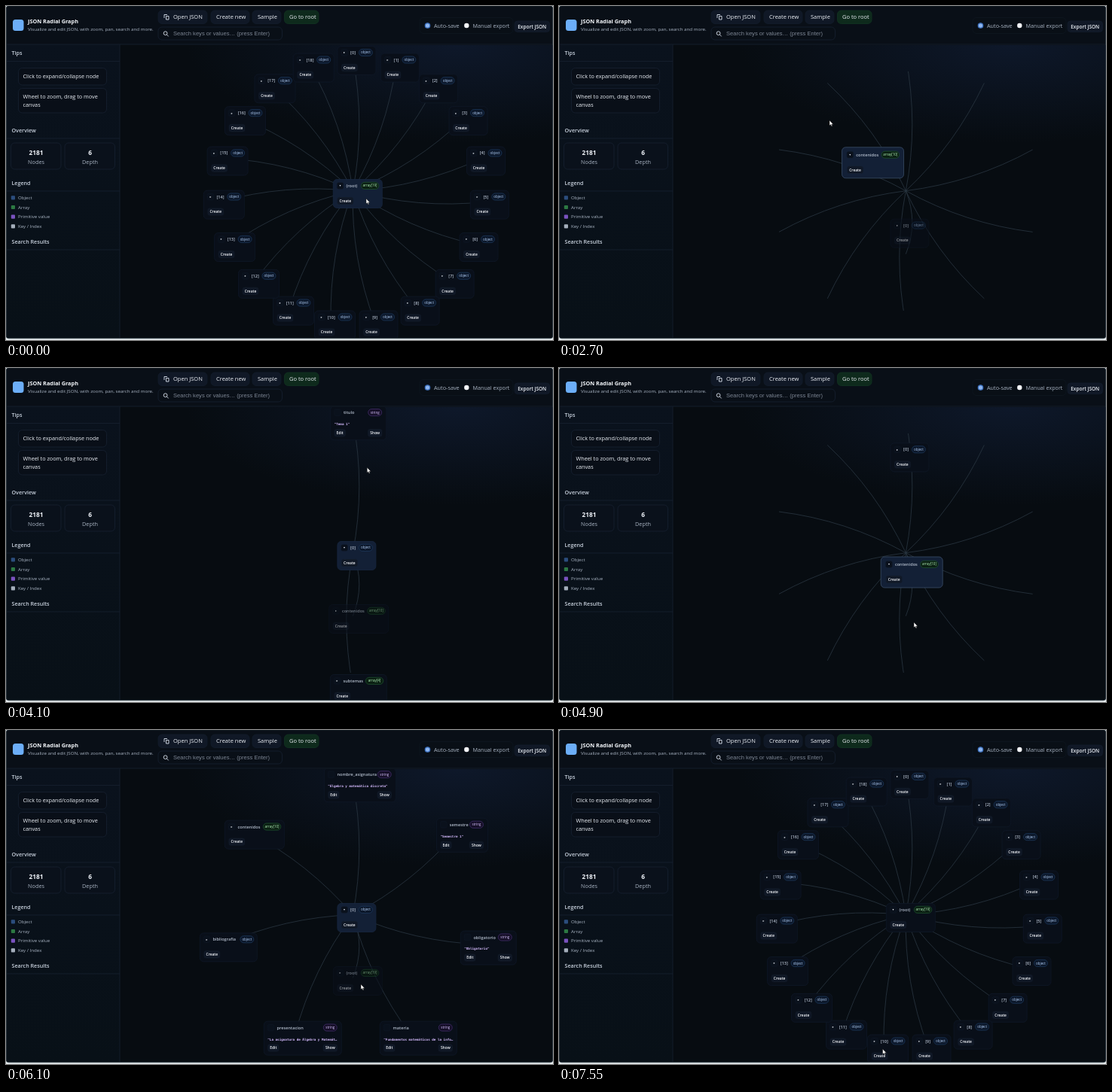
These frames come from a looping animation (726 by 444 pixels, 7650 ms). An HTML page:

```html
<!DOCTYPE html>
<html lang="en">
<head>
<meta charset="utf-8">
<title>JSON Radial Graph</title>
<style>
  html, body { margin: 0; width: 100%; height: 100%; overflow: hidden; background: #e6ecee; }
  svg { display: block; width: 726px; height: 444px; }
  text { font-family: "Open Sans", "Noto Sans", sans-serif; white-space: pre; }
  .arial { font-family: "Liberation Sans", sans-serif; }
  .mono { font-family: "DejaVu Sans Mono", monospace; }
  .sign { font-family: "DejaVu Sans", sans-serif; }
</style>
</head>
<body>
<svg viewBox="0 0 726 444" xmlns="http://www.w3.org/2000/svg">
  <defs>
    <radialGradient id="glow"><stop offset="0" stop-color="#0e182a"/><stop offset="1" stop-color="#0e182a" stop-opacity="0"/></radialGradient>
    <linearGradient id="side" x2="0" y2="1"><stop offset="0" stop-color="#0a121d"/><stop offset="1" stop-color="#081017"/></linearGradient>
    <clipPath id="stage"><rect x="151.5" y="52" width="574" height="389"/></clipPath>
    <clipPath id="edges"><rect x="230" y="87" width="460" height="318"/></clipPath>
  </defs>
  <g id="chrome"></g>
  <g clip-path="url(#stage)">
    <ellipse cx="600" cy="52" rx="360" ry="130" fill="url(#glow)"/>
    <g id="graph"></g>
  </g>
  <path id="cursor" d="M0 0V7L1.6 5.6 2.7 8 3.8 7.5 2.8 5.2H5Z" fill="#fff" stroke="#111" stroke-width=".5"/>
</svg>
<script>
const LOOP = 7650, MOVE = 250;
const CENTER = { x: 460.3, y: 245.7 }, RADIUS = 177, PARENT_DISTANCE = 84, BEND = 17;
const get = id => document.getElementById(id);
const clamp = v => Math.min(1, Math.max(0, v));
const mix = (a, b, p) => a + (b - a) * p;

const rect = (x, y, w, h, r, fill, stroke = 'none', width = .8) =>
  `<rect x="${x}" y="${y}" width="${w}" height="${h}" rx="${r}" fill="${fill}" stroke="${stroke}" stroke-width="${width}"/>`;

// y is the middle of the text line
const text = (x, y, content, size, fill, { weight = 400, cls = '', anchor = 'start' } = {}) =>
  `<text x="${x}" y="${y + size * .36}" font-size="${size}" fill="${fill}" font-weight="${weight}" class="${cls}" text-anchor="${anchor}">${content}</text>`;

const rule = (x1, y, x2) => `<path d="M${x1} ${y}H${x2}" stroke="#172130" stroke-width=".8"/>`;

function drawChrome() {
  const light = '#edf1f7', muted = '#a9b4c3';
  const middle = { anchor: 'middle' };
  const button = (x, w, label, labelX, fill = '#101826', stroke = '#141e2d') =>
    rect(x, 6, w, 17.5, 5, fill, stroke) + text(labelX, 14.5, label, 7.5, light);
  const heading = (y, label) => text(7.5, y, label, 7.15, '#c9d2de', { weight: 600 }) + rule(1, y + 11, 151);
  const stat = (x, value, label) => rect(x, 182, 66.5, 35, 5, '#0a111b', '#172131') +
    text(x + 33.5, 195, value, 8.3, light, { weight: 700, anchor: 'middle' }) +
    text(x + 33.5, 207, label, 7.3, muted, middle);
  const legend = [['Object', '#2b4d7d'], ['Array', '#2c7842'], ['Primitive value', '#7a52bf'], ['Key / Index', '#a4aebb']];

  return rect(0.4, 0, 725.2, 441.8, 3, '#070c11', '#1f2c36') +
    rect(1, 1, 724, 50, 2, '#090f17') + rect(1, 51, 150, 390, 2, 'url(#side)') +
    rule(1, 51, 725) + '<path d="M151 51V441" stroke="#172130" stroke-width=".8"/>' +
    rect(9, 18, 14.5, 15, 3.5, '#6caef8') +
    text(29, 20.5, 'JSON Radial Graph', 7.3, '#f4f7fb', { weight: 700 }) +
    text(29, 30.5, 'Visualize and edit JSON, with zoom, pan, search and more.', 6.18, muted) +
    button(202, 65, 'Open JSON', 222) +
    '<path d="M210 16V11.5H214M212.5 13.5H216V18H212.5Z" fill="none" stroke="#dbe3ee" stroke-width=".9"/>' +
    button(272, 51, 'Create new', 279) + button(327, 38, 'Sample', 334) +
    button(369.5, 45.5, 'Go to root', 376, '#0e2a1c', '#123422') +
    rect(202, 28, 164.5, 17, 5, '#090f17', '#172131') +
    '<path d="M213.6 38.2L215.6 40.4M214 36.2a2.4 2.4 0 1 1-4.8 0a2.4 2.4 0 1 1 4.8 0" fill="none" stroke="#dbe3ee" stroke-width=".9"/>' +
    text(222, 36.5, 'Search keys or values… (press Enter)', 7.58, '#7c8593', { cls: 'arial' }) +
    rect(549, 15.5, 124, 21, 5, '#090f16', '#0f1721') +
    '<circle cx="559.5" cy="26" r="3.2" fill="#8fb6ee" stroke="#3b6fbd" stroke-width="1.3"/><circle cx="611.3" cy="26" r="3.2" fill="#f4f6f9"/>' +
    text(568, 26, 'Auto-save', 7.3, muted) + text(619.5, 26, 'Manual export', 7.2, muted) +
    rect(675, 20, 46.5, 14.5, 4, '#101826', '#141e2d') +
    text(698.2, 27.5, 'Export JSON', 6.5, light, { weight: 600, anchor: 'middle' }) +
    heading(62.5, 'Tips') + heading(165, 'Overview') + heading(235, 'Legend') + heading(313, 'Search Results') +
    rect(16.5, 82.5, 117, 22.5, 5, '#090f18', '#172131') + text(22.5, 93.5, 'Click to expand/collapse node', 7.27, light) +
    rect(16.5, 109.5, 117, 32.5, 5, '#090f18', '#172131') + text(22.5, 120.8, 'Wheel to zoom, drag to move', 7.27, light) +
    text(22.5, 131.8, 'canvas', 7.27, light) +
    stat(6.5, '2181', 'Nodes') + stat(78, '6', 'Depth') +
    legend.map(([label, color], i) => rect(6.8, 252.2 + i * 12.7, 5.2, 5.2, 1, color) +
      text(16, 254.8 + i * 12.7, label, 6.15, muted)).join('');
}

// Graph model: id -> node
const nodes = {};
const add = (id, label, type, w, value) => (nodes[id] = { label, type, w, value, h: value ? 45 : 38 }, id);
const items = (prefix, count) => Array.from({ length: count }, (_, i) => add(prefix + i, `[${i}]`, 'object', i > 9 ? 54 : 51));

add('root', '(root)', 'array[19]', 65);
const rootItems = items('root', 19);
const subjectFields = [
  add('name', 'nombre_asignatura', 'string', 95, '"Álgebra y matemática discreta"'),
  add('term', 'semestre', 'string', 68, '"Semestre 1"'),
  add('required', 'obligatorio', 'string', 74, '"Obligatorio"'),
  add('matter', 'materia', 'string', 102, '"Fundamentos matemáticos de la info…'),
  add('intro', 'presentacion', 'string', 103, '"La asignatura de Álgebra y Matemát…'),
  add('books', 'bibliografia', 'object', 76),
  add('contents', 'contenidos', 'array[10]', 79)
];
const contentItems = items('contents', 10);
const topicFields = [add('title', 'titulo', 'string', 74, '"Tema 1"'), add('parts', 'subtemas', 'array[4]', 75)];

function makeScene(focus, parent, children) {
  const places = new Map();
  if (parent) places.set(parent, { x: CENTER.x, y: CENTER.y + PARENT_DISTANCE, role: 'parent' });
  children.forEach((id, i) => {
    const angle = i / children.length * 2 * Math.PI;
    places.set(id, { x: CENTER.x + RADIUS * Math.sin(angle), y: CENTER.y - RADIUS * Math.cos(angle), role: 'child' });
  });
  places.set(focus, { ...CENTER, role: 'focus' });
  return places;
}
const rootScene = makeScene('root', null, rootItems);
const subjectScene = makeScene('root0', 'root', subjectFields);
const contentsScene = makeScene('contents', 'root0', contentItems);
const topicScene = makeScene('contents0', 'contents', topicFields);

// [first visible time, time already elapsed in the move, scene]
const steps = [
  [0, 1000, rootScene], [1500, 122, subjectScene], [2700, 69, contentsScene], [3800, 80, topicScene],
  [4850, 39, contentsScene], [5600, 60, subjectScene], [6400, 70, rootScene]
];
const hovers = [
  [0, 'root'], [850, ''], [1100, 'root0'], [1750, ''], [2100, 'contents'], [3300, ''], [3500, 'contents0'],
  [4150, ''], [4500, 'contents'], [5600, 'root0'], [6400, 'root'], [7350, '']
];
const cursorPath = [
  [0, 478, 256], [700, 478, 256], [1250, 475, 86.5], [1550, 475, 86.5], [2250, 360, 153], [2400, 359, 152],
  [3250, 359, 152], [3600, 481, 88], [3900, 481, 88], [4650, 471, 338], [7300, 471, 338], [7550, 429.5, 424], [LOOP, 429.5, 424]
];
const lastIndex = (list, t) => list.findLastIndex(([at]) => at <= t);

function drawEdge({ x, y, role }) {
  const [a, b] = role === 'parent' ? [{ x, y }, CENTER] : [CENTER, { x, y }];
  const dx = b.x - a.x, dy = b.y - a.y, length = Math.hypot(dx, dy);
  const cx = (a.x + b.x) / 2 - dy / length * BEND, cy = (a.y + b.y) / 2 + dx / length * BEND;
  return `<path d="M${a.x} ${a.y}Q${cx} ${cy} ${b.x} ${b.y}"/>`;
}

const badgeColors = { o: ['#0c182b', '#1e3a5e', '#b5d2fa'], a: ['#0b2013', '#1f5230', '#b4f5bb'], s: ['#160f28', '#45306f', '#d9c5ff'] };

function drawNode(id, x, y, { opacity, hovered, moving, open }) {
  const { label, type, w, h, value } = nodes[id];
  const [fill, stroke, ink] = badgeColors[type[0]];
  const left = x - .4 * w, top = y - .4 * h, grow = moving ? 1.5 : 0;
  const badge = type === 'object' || value ? 18 : 23.5, badgeRight = left + w - (value ? 6 : 4.5);
  const small = (cx, dy, bw, content) => rect(left + cx - bw / 2, top + dy - 4.7, bw, 9.4, 2.5, '#101826', '#141e2d', .5) +
    text(left + cx, top + dy, content, 4.95, '#f6f8fc', { weight: 600, anchor: 'middle' });
  const body = value
    ? text(left + 5, top + 23.8, value, 4.25, '#d6bcff', { cls: 'mono', weight: 700 }) + small(12.5, 35.5, 14.5, 'Edit') + small(w - 15, 35.5, 18.5, 'Show')
    : small(16, 28.5, 21, 'Create');
  return `<g opacity="${opacity}">` +
    rect(left - grow, top - grow, w + 2 * grow, h + 2 * grow, 5, hovered ? '#132036' : '#090f19',
      moving ? '#3a4d66' : hovered ? '#182740' : '#101927', .8) +
    rect(left + 5, top + 4.2, 8.5, 8.5, 2, '#0a111c', '#101a28', .5) +
    (value ? '' : text(left + 9.2, top + 8.4, open ? '▾' : '▸', 4, '#eef2f8', { cls: 'sign', anchor: 'middle' })) +
    text(left + 17.2, top + 8.4, label, 5.6, '#b3bdcc', { weight: 600 }) +
    rect(badgeRight - badge, top + 3.8, badge, 9.2, 4.6, fill, stroke, .7) +
    text(badgeRight - badge / 2, top + 8.3, type, 4.5, ink, { anchor: 'middle' }) + body + '</g>';
}

function drawGraph(t) {
  const index = lastIndex(steps, t), [at, lead, scene] = steps[index];
  const previous = index ? steps[index - 1][2] : new Map();
  const elapsed = t - at + lead;
  const progress = 1 - (1 - clamp(elapsed / MOVE)) ** 3;
  const fade = clamp((elapsed - 130) / 160);
  const hoveredId = hovers[lastIndex(hovers, t)][1];
  let edges = '', boxes = '';
  for (const [id, place] of scene) {
    const { role } = place, from = previous.get(id) || place;
    if (role !== 'focus') edges += drawEdge(place);
    boxes += drawNode(id, mix(from.x, place.x, progress), mix(from.y, place.y, progress), {
      opacity: (previous.has(id) || !index ? 1 : fade) * (role === 'parent' ? .58 : 1),
      hovered: id === hoveredId,
      moving: role === 'focus' && progress < 1,
      open: role === 'focus'
    });
  }
  return `<g clip-path="url(#edges)" fill="none" stroke="#2a3642" stroke-width=".8">${edges}</g>${boxes}`;
}

function cursorAt(t) {
  const i = Math.min(lastIndex(cursorPath, t), cursorPath.length - 2);
  const [t0, x0, y0] = cursorPath[i], [t1, x1, y1] = cursorPath[i + 1];
  const u = clamp((t - t0) / (t1 - t0)), p = u * u * (3 - 2 * u);
  return `translate(${mix(x0, x1, p)} ${mix(y0, y1, p)})`;
}

get('chrome').innerHTML = drawChrome();
const start = performance.now();
function frame() {
  const t = (performance.now() - start) % LOOP;
  get('graph').innerHTML = drawGraph(t);
  get('cursor').setAttribute('transform', cursorAt(t));
  requestAnimationFrame(frame);
}
frame();
</script>
</body>
</html>
```
